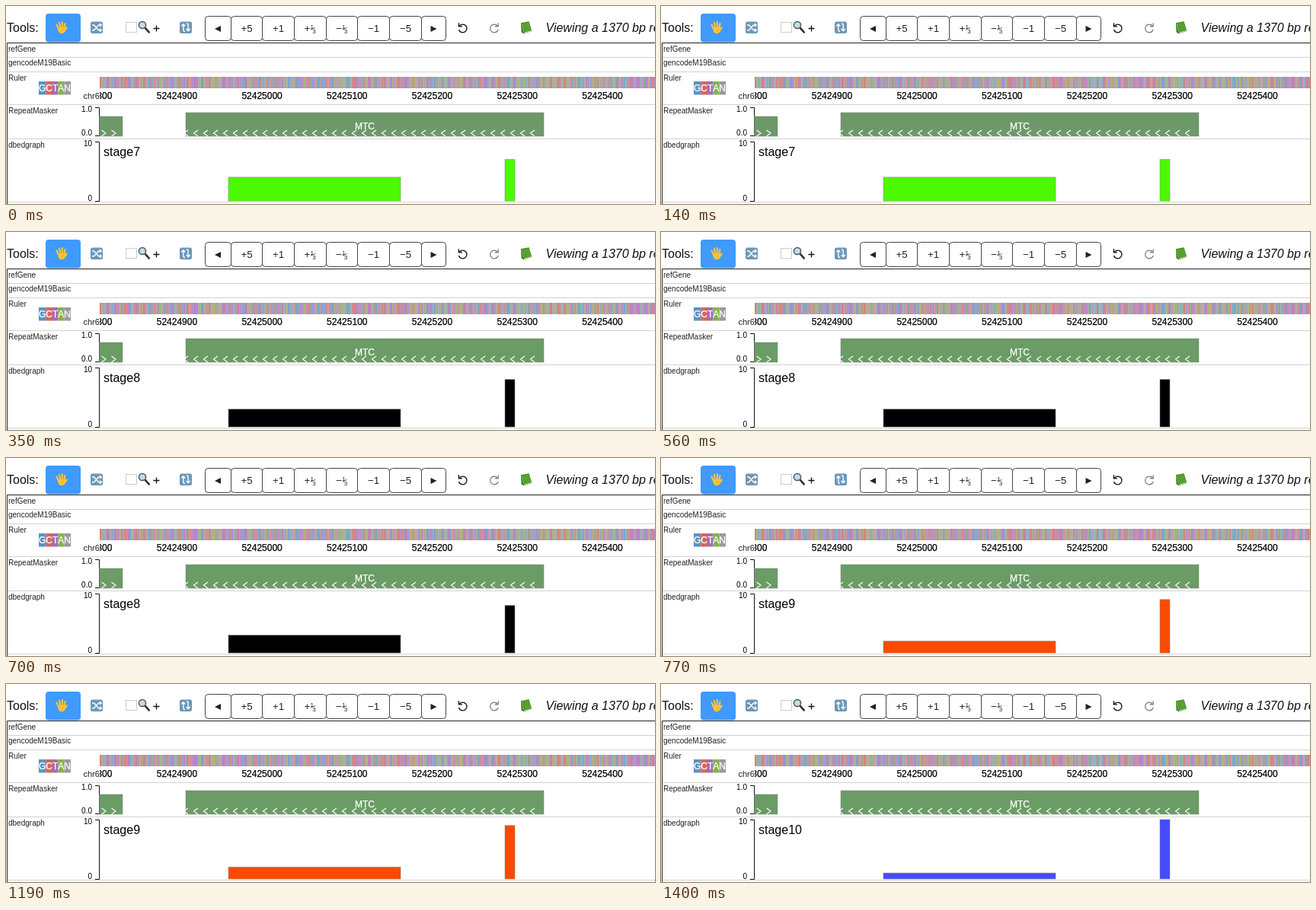
Recreate the animation shown at these times as an HTML page. Size 852x260 px, loop 1470 ms.

```html
<!DOCTYPE html>
<html lang="en">
<head>
<meta charset="utf-8">
<title>Genome track stages</title>
<style>
html, body { margin: 0; width: 100%; height: 100%; overflow: hidden; background: #fff; }
svg { display: block; width: 852px; height: 260px; font-family: "Liberation Sans", Arial, sans-serif; }
</style>
</head>
<body>
<svg id="stage" viewBox="0 0 852 260"></svg>
<script>
const NS = "http://www.w3.org/2000/svg";
const svg = document.getElementById("stage");

function add(tag, attrs, text) {
  const node = document.createElementNS(NS, tag);
  for (const key in attrs) node.setAttribute(key, attrs[key]);
  if (text !== undefined) node.textContent = text;
  svg.appendChild(node);
  return node;
}
const rect = (x, y, width, height, fill, more) =>
  add("rect", { x, y, width, height, fill, ...more });
const label = (x, y, size, text, more) =>
  add("text", { x, y, "font-size": size, ...more }, text);
const line = (d, stroke, width = 1, more) =>
  add("path", { d, stroke, "stroke-width": width, fill: "none", ...more });
const shape = (d, fill) => add("path", { d, fill });
const middle = { "text-anchor": "middle" };
const end = { "text-anchor": "end" };
const heavy = color => ({ ...middle, fill: color, stroke: color, "stroke-width": 0.25 });
const softEdge = { stroke: "#808080", "stroke-opacity": 0.5 };

function drawHand() {
  rect(52, 10, 46, 37.5, "#409aff", { rx: 4 });
  const skin = "#fcc537", round = { "stroke-linecap": "round" };
  line("M69 30L66.6 24.6M71.3 28L69.9 21.8M74 28L73.8 21.2M76.6 29L77.4 23.2", skin, 2.2, round);
  line("M76.8 32.5L79.6 28.6", skin, 2.4, round);
  shape("M67.9 28H77.7L78.4 31.5Q76.8 36.3 73.2 36.3Q69.6 36.3 68.6 32.5Z", skin);
  line("M70.2 28.5L68.8 25M72.7 28V23.5M75.3 28.5L75.7 24.5M76 30.5Q73.5 31 73.3 34", "#d8922a", 0.6);
}

function drawTile(x, d) {
  rect(x, 20.5, 16, 15.5, "#6b98b7", { rx: 2.5 });
  line(d, "#fff", 1.4, { "stroke-linejoin": "round" });
}

function drawZoom() {
  rect(157.5, 21.5, 14, 13, "none", { stroke: "#999", "stroke-dasharray": "1 1" });
  line("M182.8 28.8L187.7 34.4", "#333", 2.6, { "stroke-linecap": "round" });
  add("circle", { cx: 179, cy: 25, r: 4.6, fill: "#bfdcea", stroke: "#555", "stroke-width": 1.5 });
  line("M193.5 29.5H201.5M197.5 25.5V33.5", "#111", 1.3);
}

function drawButtons() {
  const edges = [261.5, 295.5, 336.5, 378.5, 420.5, 461.5, 503.5, 545.5, 577.5];
  const names = ["", "+5", "+1", "+", "−", "−1", "−5", ""];
  names.forEach((name, i) => {
    const left = edges[i], right = edges[i + 1], mid = (left + right) / 2;
    rect(left, 13.5, right - left, 32, "#fff", { rx: 4, stroke: "#444" });
    const ink = { ...middle, fill: "#222" };
    if (i === 3 || i === 4) {
      label(mid - 4, 34, 13.3, name, ink);
      label(mid + 2.2, 29.5, 8, "1", ink);
      label(mid + 5, 36, 8, "3", ink);
      line(`M${mid + 0.5} 31L${mid + 6.5} 28.5`, "#222", 0.8);
    } else label(mid, 34, 13.3, name, ink);
  });
  shape("M282 26V34L274 30Z", "#222");
  shape("M557.5 26V34L565.5 30Z", "#222");
}

function drawBook() {
  shape("M676 22.3L686.5 20.3L690.3 33L679.8 36.3L676.6 34.4Z", "#37791f");
  shape("M678.2 22.6L686.3 21L689.6 31.7L680.8 34Z", "#58a02f");
  line("M677.2 23L679.6 34", "#7cc04e", 1.2);
  line("M680 35.2L690 32.5", "#e4e9d8", 1);
}

function drawToolbar() {
  label(1, 34, 16, "Tools:", { fill: "#111" });
  drawHand();
  drawTile(111, "M113 25H115.5L121.5 31.8H125M113 31.8H115.5L121.5 25H125M123 23L125.3 25L123 27M123 29.8L125.3 31.8L123 33.8");
  drawZoom();
  drawTile(228, "M235 33.5Q232.8 33.5 232.8 31V24M230.3 26.5L232.8 23.7L235.3 26.5M237 23Q239.2 23 239.2 25.5V32.5M236.7 30L239.2 32.8L241.7 30");
  drawButtons();
  const undo = "M595.4 26A5.4 5.4 0 1 1 594.4 31M594.4 22.3V26.8H599";
  line(undo, "#111", 1.3);
  line(undo, "#777", 1.2, { transform: "translate(1240.6 0) scale(-1 1)" });
  drawBook();
  label(708.5, 34, 16, "Viewing a 1370 bp region", { "font-style": "italic", fill: "#111" });
}

function drawRuler() {
  const colors = ["#5a92c4", "#d4675f", "#a36db9", "#86b150", "#9a9a9a"];
  const starts = [43, 52.3, 61, 68.3, 76.3, 85];
  [..."GCTAN"].forEach((base, i) => {
    rect(starts[i], 99, starts[i + 1] - starts[i], 17.5, colors[i]);
    label((starts[i] + starts[i + 1]) / 2, 112.3, 12, base, heavy("#fff"));
  });

  let seed = 42424;
  const random = () => (seed = (seed * 16807) % 2147483647) / 2147483647;
  const tones = ["#6ea3d0", "#d67c7c", "#b57bc9", "#a4b173"];
  const paths = tones.map(() => "");
  for (let x = 123; x < 852; x += 1.117) {
    paths[Math.floor(random() * 4)] += `M${x.toFixed(2)} 93h0.95v15h-0.95z`;
  }
  rect(123, 93, 729, 15, "#ccc6cc");
  paths.forEach((d, i) => shape(d, tones[i]));

  const clip = add("clipPath", { id: "view" });
  clip.appendChild(rect(123, 88, 729, 40, "#000"));
  for (let i = 0; i < 7; i++) {
    label(112.7 + 111.7 * i, 122.3, 12, 52424800 + 100 * i, { ...heavy("#000"), "clip-path": "url(#view)" });
  }
  label(101.5, 122.3, 11, "chr6", { fill: "#222" });
}

function drawAxis(top, bottom, high, low) {
  line(`M117 ${top}H122.5V${bottom}H117`, "#111");
  label(113, top + 5.5, 10, high, end);
  label(113, bottom - 0.5, 10, low, end);
}

function drawRepeats() {
  drawAxis(133.5, 170.5, "1.0", "0.0");
  const blocks = [
    rect(122.5, 145, 30.5, 26, "#6b9c66", softEdge),
    rect(236, 140, 470, 31, "#6b9c66", softEdge)
  ];
  let arrows = "M125.5 163l5.5 4l-5.5 4M138.5 163l5.5 4l-5.5 4";
  for (let i = 0; i < 36; i++) arrows += `M${(239 + 13 * i).toFixed(1)} 163l-5.5 4l5.5 4`;
  line(arrows, "#fff", 1.1);
  label(471, 162.3, 12, "MTC", heavy("#fff"));
  return blocks;
}

drawToolbar();
line("M852 48.5H1.5V260", "#222");
line("M2 67.5H852M2 86.5H852M2 129.5H852M2 174.5H852M2 257.5H852", "#d2d2d2");
[["refGene", 60], ["gencodeM19Basic", 78], ["Ruler", 97.5], ["RepeatMasker", 140.5], ["dbedgraph", 185.5]]
  .forEach(([name, y]) => label(3, y, 10, name, { fill: "#222" }));
drawRuler();
const repeats = drawRepeats();
drawAxis(178.5, 256.5, "10", "0");
const title = label(128, 196.5, 16, "");
const wide = rect(292, 0, 226, 0, "none", softEdge);
const narrow = rect(655, 0, 13, 0, "none", softEdge);

const LOOP = 1470;
const stages = [
  { from: 0, n: 7, fill: "#4cf900", block: "#6d9969" },
  { from: 350, n: 8, fill: "#000", block: "#6b9c66" },
  { from: 770, n: 9, fill: "#fa4a00", block: "#6b9c66" },
  { from: 1400, n: 10, fill: "#444bfa", block: "#6b9c66" }
];

function setBar(bar, value, fill) {
  const height = value * 7.8;
  bar.setAttribute("y", 256 - height);
  bar.setAttribute("height", height);
  bar.setAttribute("fill", fill);
}

let shown;
function render(time) {
  const t = time % LOOP;
  const stage = stages.filter(s => t >= s.from).pop();
  if (stage === shown) return;
  shown = stage;
  title.textContent = "stage" + stage.n;
  setBar(narrow, stage.n, stage.fill);
  setBar(wide, 11 - stage.n, stage.fill);
  repeats.forEach(block => block.setAttribute("fill", stage.block));
}

let start;
function tick(now) {
  start ??= now;
  render(Math.max(0, now - start));
  requestAnimationFrame(tick);
}
render(0);
requestAnimationFrame(tick);
</script>
</body>
</html>
```
